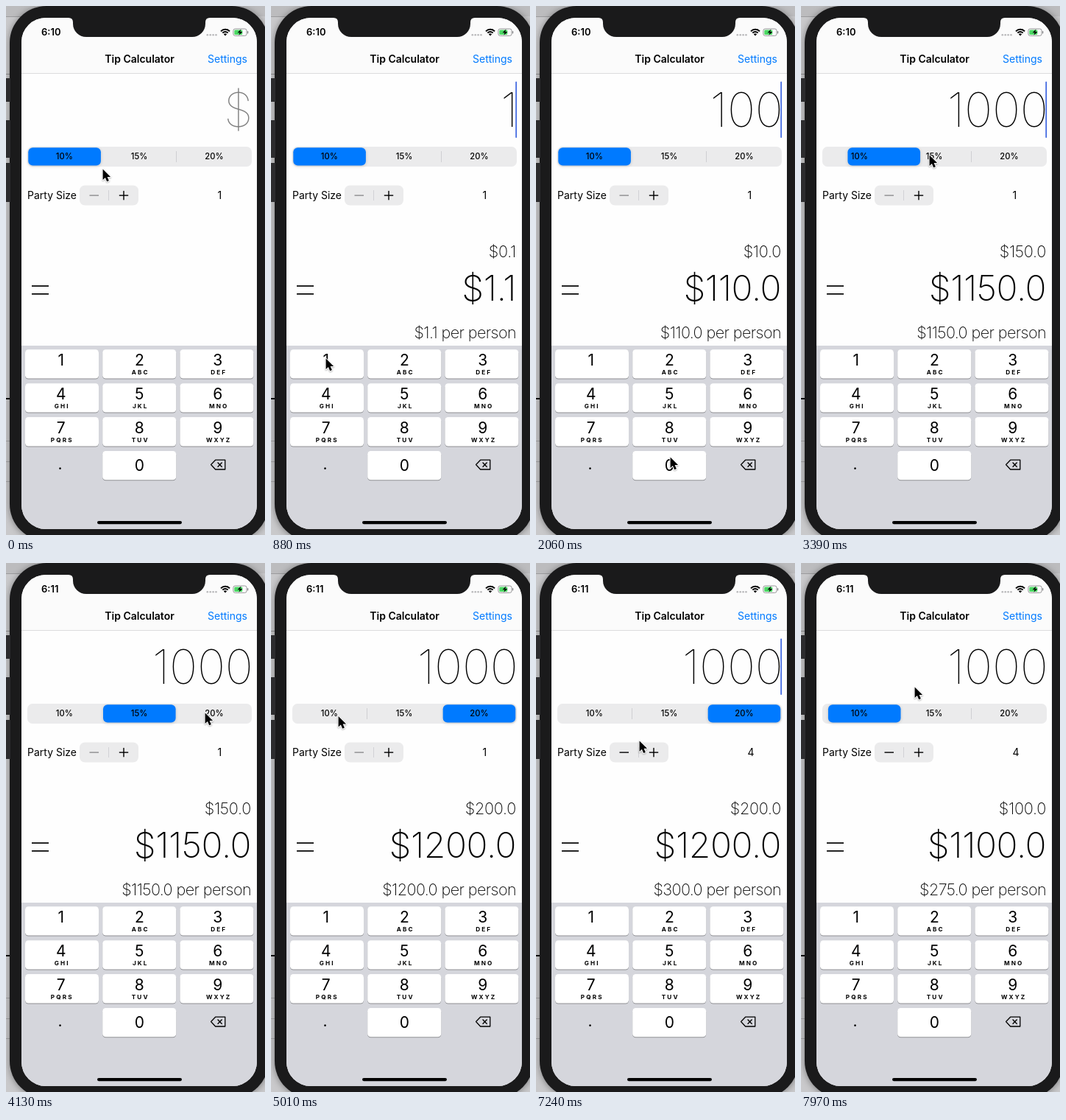
Recreate the animation shown at these times as an HTML page with a canvas. Size 352x718 px, loop 8 s.

```html
<!DOCTYPE html>
<html lang="en">
<head>
<meta charset="utf-8">
<title>Tip Calculator</title>
<style>
html, body { margin: 0; width: 100%; height: 100%; overflow: hidden; background: #c6c6c8; }
canvas { display: block; width: 352px; height: 718px; }
</style>
</head>
<body>
<canvas id="stage"></canvas>
<script>
const W = 352, H = 718, LOOP = 8000, STEP = 147.6;
const BLUE = '#007aff', FILL = '#ebebec';
const KNOB_X = 30.3, KNOB_W = 98.6;
const canvas = document.getElementById('stage');
const ctx = canvas.getContext('2d');
const dpr = window.devicePixelRatio || 1;
canvas.width = W * dpr;
canvas.height = H * dpr;

const clamp = v => Math.max(0, Math.min(1, v));
const smooth = v => v * v * (3 - 2 * v);
const during = (t, a, b) => t >= a && t < b;

// last value whose start time has passed
const at = (t, list) => list.reduce((v, [start, val]) => t >= start ? val : v, list[0][1]);

const ENTRY = [[0, ''], [700, '1'], [1750, '10'], [2040, '100'], [2340, '1000']];
const RATES = [[0, 0], [3328, 1], [4390, 2], [7670, 0]];
const PARTY = [[0, 1], [5590, 2], [6040, 3], [6620, 4]];
const PRESSES = [[5590, 5730], [6040, 6300], [6620, 6760]];
const KEY_DOWN = [['1', 570, 700], ['0', 1600, 1750], ['0', 1900, 2040], ['0', 2190, 2340]];

// pointer stops: time, x, y
const PATH = [
  [0, 131, 221], [590, 74, 478], [885, 74, 478], [1340, 182, 612], [2790, 182, 612],
  [3240, 174, 202], [3700, 174, 202], [4130, 270, 203], [4430, 270, 203],
  [4865, 85, 206], [5010, 91, 207.5], [5100, 91, 207.5], [5460, 154, 252],
  [7100, 154, 252], [7530, 92, 203], [7680, 92, 203], [7970, 154, 168], [8000, 154, 168]
];

function pointerAt(t) {
  const i = Math.max(1, PATH.findIndex(p => p[0] > t));
  const [t0, x0, y0] = PATH[i - 1], [t1, x1, y1] = PATH[i];
  const k = smooth(clamp((t - t0) / (t1 - t0)));
  return [x0 + (x1 - x0) * k, y0 + (y1 - y0) * k];
}

function knobAt(t) {
  let x = KNOB_X;
  for (const [start, seg] of RATES) {
    if (t < start) break;
    const s = (t - start) / 1000 * 17.5;
    x += (KNOB_X + seg * 101.7 - x) * (1 - (1 + s) * Math.exp(-s));
  }
  return x;
}

function caretAt(t) {
  if (during(t, 700, 2780)) return 1;
  const p = t % 1000 / 1000;
  return clamp((p - 0.2) / 0.03) * clamp((0.88 - p) / 0.1);
}

function rect(x, y, w, h, color) {
  ctx.fillStyle = color;
  ctx.fillRect(x, y, w, h);
}

function box(x, y, w, h, r, color) {
  ctx.fillStyle = color;
  ctx.beginPath();
  ctx.roundRect(x, y, w, h, r);
  ctx.fill();
}

function shadowBox(x, y, w, h, r, color, alpha, blur) {
  ctx.save();
  ctx.shadowColor = `rgba(0,0,0,${alpha})`;
  ctx.shadowBlur = blur * dpr;
  ctx.shadowOffsetY = dpr;
  box(x, y, w, h, r, color);
  ctx.restore();
}

function text(str, x, y, size, o = {}) {
  ctx.font = `${o.weight || 400} ${size}px Inter, Roboto, sans-serif`;
  ctx.textAlign = o.align || 'center';
  ctx.letterSpacing = (o.space || 0) + 'px';
  ctx.fillStyle = o.color || '#000';
  ctx.fillText(str, x, y);
  ctx.letterSpacing = '0px';
}

function stroke(points, width, color, close) {
  ctx.strokeStyle = color;
  ctx.lineWidth = width;
  ctx.beginPath();
  points.forEach(([x, y], i) => i ? ctx.lineTo(x, y) : ctx.moveTo(x, y));
  if (close) ctx.closePath();
  ctx.stroke();
}

function backdrop() {
  rect(0, 0, W, H, '#c9c9cb');
  rect(0, 0, W, 14, '#bcbcbe');
  rect(0, 14, 20, 1, '#9b9b9d');
  rect(0, 92, 5, 1, '#8e8e90');
  rect(0, 532, 6, 2, '#111');
  [590, 618, 645].forEach(y => rect(0, y, 6, 1, '#a4a4a6'));
  shadowBox(5, 0, 352, 726, 50, '#1a1a1b', 0.4, 10);
  [[98, 32], [155, 51], [213, 53]].forEach(([y, h]) => rect(0, y, 6, h, '#2c2c2e'));
}

function statusBar(t) {
  // notch with flared upper corners
  ctx.fillStyle = '#1a1a1b';
  ctx.beginPath();
  ctx.moveTo(85, 15);
  ctx.lineTo(277, 15);
  ctx.lineTo(277, 16);
  ctx.quadraticCurveTo(271, 16, 271, 22);
  ctx.arcTo(271, 42, 251, 42, 18);
  ctx.arcTo(91, 42, 91, 22, 18);
  ctx.lineTo(91, 22);
  ctx.quadraticCurveTo(91, 16, 85, 16);
  ctx.fill();

  text(t < 3600 ? '6:10' : '6:11', 48, 40, 13, { weight: 600, align: 'left' });
  for (let i = 0; i < 4; i++) box(272.5 + i * 3.9, 38, 2.6, 2.6, 1.3, '#b8b8ba');

  ctx.strokeStyle = '#000';
  ctx.lineWidth = 1.9;
  for (const r of [8.2, 5]) {
    ctx.beginPath();
    ctx.arc(298, 40, r, -Math.PI * 0.76, -Math.PI * 0.24);
    ctx.stroke();
  }
  ctx.fillStyle = '#000';
  ctx.beginPath();
  ctx.moveTo(298, 40.4);
  ctx.arc(298, 40.4, 3, -Math.PI * 0.76, -Math.PI * 0.24);
  ctx.fill();

  ctx.strokeStyle = '#8c8c8e';
  ctx.lineWidth = 0.9;
  ctx.beginPath();
  ctx.roundRect(308.9, 31, 18.2, 9.4, 2.5);
  ctx.stroke();
  box(310.3, 32.4, 11, 6.6, 1.3, '#4cd964');
  box(328, 34, 1.3, 3.4, 0.6, '#8c8c8e');
  ctx.fillStyle = '#000';
  ctx.beginPath();
  [[319.4, 31.6], [314.6, 36.2], [317.6, 36.2], [316.4, 39.8], [321.4, 35], [318.3, 35]]
    .forEach(([x, y]) => ctx.lineTo(x, y));
  ctx.fill();
}

function segments(t) {
  box(29, 191, 305, 27, 7, FILL);
  const x = knobAt(t);
  const bar = (px, alpha) => {
    ctx.globalAlpha = clamp(alpha);
    rect(px, 197, 1, 15, '#cfcfd2');
    ctx.globalAlpha = 1;
  };
  bar(130, (x - 133) / 30);
  bar(231, (230 - x - KNOB_W) / 30);
  shadowBox(x, 192.2, KNOB_W, 24.2, 6, BLUE, 0.16, 4);
  ['10%', '15%', '20%'].forEach((s, i) => text(s, 79.3 + i * 101.8, 208.4, 11.2, { weight: 500 }));
}

function stepper(t, party) {
  text('Party Size', 29, 262, 14, { align: 'left' });
  box(100, 243.5, 80, 27, 7, FILL);
  if (PRESSES.some(([a, b]) => during(t, a, b))) box(139.5, 243.5, 40.5, 27, 7, '#c6c6c9');
  else rect(139, 250, 1, 14, '#d2d2d5');
  rect(113.5, 256.4, 12.5, 1.4, party > 1 ? '#000' : '#8d8d8f');
  rect(153.8, 256.4, 12.4, 1.4, '#000');
  rect(159.3, 250.9, 1.4, 12.4, '#000');
  text(String(party), 287.5, 262, 14, { align: 'left' });
}

function amounts(t, entry, party) {
  const right = (s, x, y, size, space, weight, color) =>
    text(s, x, y, size, { align: 'right', weight, space, color });
  if (entry) {
    const base = Number(entry);
    const tip = base * (10 + 5 * at(t, RATES)) / 100;
    const total = base + tip;
    right(entry, 335.5, 164.4, 64.5, -0.3, 130);
    right('$' + tip.toFixed(1), 333, 341, 21.7, -0.3, 160);
    right('$' + total.toFixed(1), 333.2, 400, 48, -0.4, 150);
    right('$' + (total / party).toFixed(1) + ' per person', 333, 451, 21.6, -0.6, 160);
  } else {
    right('$', 335.5, 164.4, 64.5, 0, 130, '#808080');
  }
  rect(35, 379.2, 23, 1.7, '#000');
  rect(35, 390, 23, 1.7, '#000');
  ctx.globalAlpha = caretAt(t);
  box(332.3, 102.5, 1.8, 76.5, 0.9, '#4169e1');
  ctx.globalAlpha = 1;
}

function keypad(t) {
  rect(21, 461, 320, 250, '#d5d6dc');
  const letters = ['', 'ABC', 'DEF', 'GHI', 'JKL', 'MNO', 'PQRS', 'TUV', 'WXYZ'];
  // labels sit in even thirds of the screen, the key caps slightly closer
  const key = (label, sub, col, row) => {
    const x = 26 + col * 105.2, y = 466.3 + row * 45.9, cx = 74.8 + col * 106.5;
    const down = KEY_DOWN.some(([k, a, b]) => k === label && during(t, a, b));
    box(x, y + 1, 100, 39.3, 4.3, '#8f9094');
    box(x, y, 100, 39.3, 4.3, down ? '#b4b8c2' : '#fff');
    text(label, cx, y + (row === 3 ? 26.8 : 21.7), 21);
    if (sub) text(sub, cx + 1.4, y + 33.8, 8.2, { weight: 700, space: 2.1 });
  };
  letters.forEach((sub, i) => key(String(i + 1), sub, i % 3, Math.floor(i / 3)));
  key('0', '', 1, 3);
  text('.', 73.5, 628.5, 21);

  ctx.lineJoin = 'round';
  stroke([[278.6, 622.5], [284.6, 616.2], [297.8, 616.2], [297.8, 629], [284.6, 629]], 1.3, '#000', true);
  stroke([[287.6, 619.5], [293.6, 625.7]], 1.3, '#000');
  stroke([[293.6, 619.5], [287.6, 625.7]], 1.3, '#000');
  box(124, 699, 115, 4.2, 2.1, '#000');
}

function pointer(t) {
  const [x, y] = pointerAt(t);
  ctx.save();
  ctx.translate(x, y);
  ctx.beginPath();
  [[0.6, 0.6], [0.6, 15], [3.9, 11.9], [6.2, 17.2], [8.9, 16], [6.6, 10.9], [11.1, 10.9]]
    .forEach(([px, py]) => ctx.lineTo(px, py));
  ctx.closePath();
  ctx.lineJoin = 'round';
  ctx.lineWidth = 2;
  ctx.strokeStyle = '#fff';
  ctx.shadowColor = 'rgba(0,0,0,.3)';
  ctx.shadowBlur = 2 * dpr;
  ctx.shadowOffsetY = dpr;
  ctx.stroke();
  ctx.shadowColor = 'transparent';
  ctx.fillStyle = '#000';
  ctx.fill();
  ctx.restore();
}

function draw(t) {
  const entry = at(t, ENTRY), party = at(t, PARTY);
  ctx.setTransform(dpr, 0, 0, dpr, 0, 0);
  backdrop();
  ctx.save();
  ctx.beginPath();
  ctx.roundRect(21, 16, 320, 694, 33);
  ctx.clip();
  rect(21, 16, 320, 694, '#fefefe');
  rect(21, 16, 320, 75, '#fbfbfb');
  rect(21, 91, 320, 1, '#dcdcdd');
  statusBar(t);
  text('Tip Calculator', 181.5, 77.3, 14, { weight: 600 });
  text('Settings', 328, 77.3, 14, { align: 'right', color: BLUE });
  segments(t);
  stepper(t, party);
  amounts(t, entry, party);
  keypad(t);
  ctx.restore();
  pointer(t);
}

const begin = performance.now();
function tick() {
  const t = (performance.now() - begin) % LOOP;
  draw(Math.floor((t + 10) / STEP) * STEP);
  requestAnimationFrame(tick);
}
tick();
</script>
</body>
</html>
```
